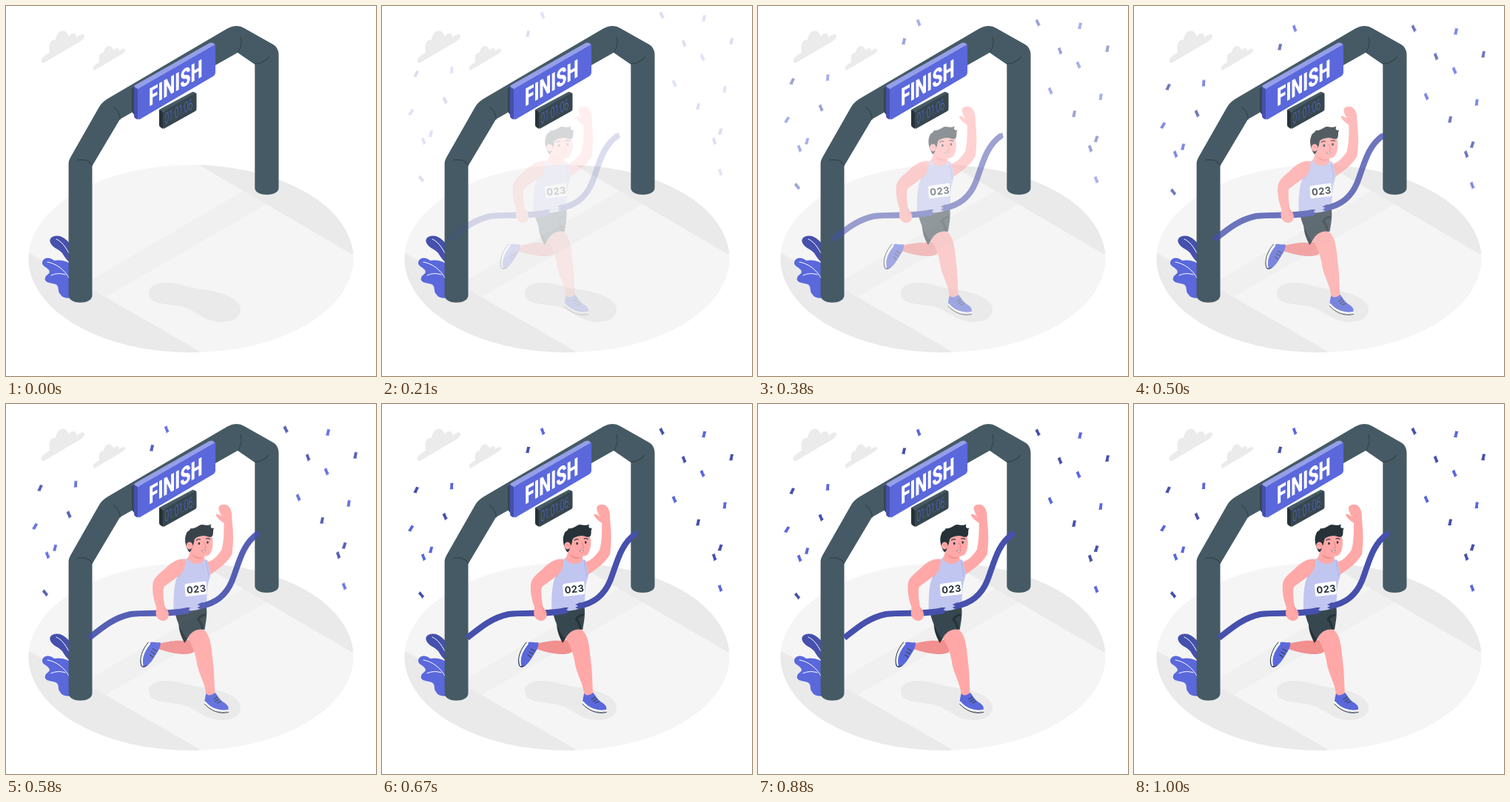
Recreate the animation shown at these times as an HTML page. Size 500 by 500 pixels, loop 1040 ms.

```html
<!DOCTYPE html>
<html lang="en">
<head>
<meta charset="utf-8">
<title>Finish line</title>
<style>
  html, body { margin: 0; width: 100%; height: 100%; overflow: hidden; background: #fff; }
  svg { display: block; width: 100%; height: 100%; }
  .blue { fill: #5a68dc; }
  .navy { fill: #4650ad; }
  .skin { fill: #ffa8a7; }
  .skin2 { fill: #f28f8f; }
  .slate { fill: #455a64; }
  .dark { fill: #37474f; }
  .ink { fill: #263238; }
  .shade { fill: #eaeaea; }
  .line { fill: none; stroke-linecap: round; stroke-linejoin: round; }
  .ribbon { fill: none; stroke: #4650ad; stroke-width: 8; }
</style>
</head>
<body>
<svg viewBox="0 0 500 500">
  <defs>
    <clipPath id="disc"><ellipse cx="250" cy="341.5" rx="219.5" ry="126.8"/></clipPath>
    <path id="cloud" d="M48 76C46 70 54 66 59 63C56 51 62 44 67 46C68 33 80 28 85 41C89 35 96 36 95 43C101 37 107 37 106 42C105 46 97 50 90 54L56 74C52 77 49 78 48 76Z"/>
    <path id="bit" d="M-1-4.4C.6-4.8 1.800-3.800 3.200-4.400C2.400-1.500 1.500 1.400 1.800 3.900C.2 4.600-1.400 3.500-3 4.300C-1.600 1.400-1.600-1.600-1-4.400Z"/>
  </defs>

  <!-- ground -->
  <g clip-path="url(#disc)">
    <rect y="200" width="500" height="280" fill="#f5f5f5"/>
    <path fill="#f0f0f0" d="M105 376L320 250L352 268L135 393Z"/>
    <path class="shade" d="M260 214.5L472 338V200H260Z"/>
    <path class="shade" d="M28 331.8L267 469.8H28Z"/>
  </g>
  <path class="shade" d="M193 389C192 378 205 373 219 374C238 375 247 381 266 383C292 386 318 396 317 411C315 424 302 428 288 427C267 425 258 413 241 407C224 402 195 406 193 389Z"/>

  <!-- sky -->
  <g fill="#ebebeb">
    <use href="#cloud"/>
    <use href="#cloud" transform="translate(82.4 29.5) scale(.741)"/>
  </g>

  <!-- plant -->
  <path class="navy" d="M60 320C57 313 65 309 73 311C81 314 86 320 90 326V348C83 346 80 340 76 334C71 328 63 327 60 320Z"/>
  <path class="blue" d="M49 346C51 339 60 339 65 344C74 342 85 345 92 352V393C84 396 76 395 73 389C69 385 73 379 67 376C60 374 51 374 53 367C55 362 61 362 58 357C56 353 48 352 49 346Z"/>
  <g class="line" stroke="#fff" stroke-width="1">
    <path d="M68 315C75 318 80 325 85 334"/>
    <path d="M56 346C68 348 79 356 86 369M61 364C67 361 74 361 80 363"/>
  </g>

  <!-- arch -->
  <path class="slate" d="M84.600 391V213C84.600 209 86 207 88 203L125 138C128 132 132 128.500 137 125.500L299 30.500C308 26 315 26 322 30L361 52C366 55 368.500 60 368.500 66V246C368.500 258 336.300 258 336.300 246V79L313 63L154 153L116.500 216V391C116.500 404 84.600 404 84.600 391Z"/>
  <g class="line" stroke="#37474f" stroke-width="1.4">
    <path d="M97 208C105 207 113 209 116.500 215"/>
    <path d="M146 137C151 141 154 146 154 153"/>
    <path d="M314 62C318 55 319 49 317 42"/>
    <path d="M337 78C344 78 351 74 355 69"/>
  </g>
  <path class="dark" d="M170 112L174 108V148L170 143Z"/>

  <!-- banner -->
  <path fill="#959fe9" d="M173 110Q173 107 176 106L275 50Q278 49 280 50L283 53L178 113Z"/>
  <path class="navy" d="M173 109L178 112V153.500L175 152Q173 151 173 148Z"/>
  <path class="blue" d="M178 114Q178 112 180 111L280 53.500Q283 52 283 55V90Q283 93 280 95L181 153Q178 154.500 178 151Z"/>
  <text transform="matrix(.68 -.385 0 1 193 136)" font-family="Roboto, sans-serif" font-weight="900" font-size="33.500" fill="#fff">FINISH</text>

  <!-- clock -->
  <path class="slate" d="M207 140L252 116Q254 115.500 257 118L212 143Z"/>
  <path class="ink" d="M207 140L212 142.500V166L209 164Q207 163 207 161Z"/>
  <path class="dark" d="M212 144Q212 142.500 214 141.500L255 118Q257.500 117 257.500 119V139Q257.500 141 256 142L214 165.500Q212 166.500 212 164Z"/>
  <text transform="matrix(.5 -.275 0 1 214.500 159.500)" font-family="Roboto, sans-serif" font-weight="300" font-size="20" fill="#5a68dc">01:01:06</text>

  <g id="confetti" opacity="0"></g>

  <g id="runner" opacity="0">
    <!-- rear leg -->
    <path class="skin2" d="M207 324C220 322 229 319 240 320L252 318C259 322 261 332 255 336C246 340 229 338 208 331Z"/>
    <path class="blue" d="M198 322C202 321 206 323 211 322C212 328 209 332 206 337C201 345 197 353 189 356C184 356 184 350 186 344C188 336 193 330 198 322Z"/>
    <path class="line" stroke="#fff" stroke-width="2.200" d="M196.500 324C190 332 184.500 343 187 353"/>
    <path class="line" stroke="#263238" stroke-width="1" d="M195 322C187 331 182 344 185.500 354C188 356 191 355 193 353"/>
    <path class="line" stroke="#37474f" stroke-width="1.300" d="M201 331L206 334M199 335L204 338M197 339L201 342"/>

    <!-- front leg -->
    <path class="ink" d="M236 297L256 304L244 323C239 314 236 306 236 297Z"/>
    <path class="skin" d="M246 313C252 304 264 302 271 306C280 315 280 331 282 347C284 361 284 377 285 394C282 397 276 396 273 393C272 378 264 367 261 353C259 337 254 325 246 313Z"/>
    <path class="dark" d="M230 279L273 272C275 283 273 293 271 305C262 303 253 306 247 318C238 305 233 292 230 279Z"/>
    <path class="line" stroke="#263238" stroke-width="3" d="M271 285C267 286 264 288 262 291C266 294 267 298 268 303"/>
    <path class="blue" d="M273 391C276 395 281 394 285 390C288 393 290 398 295 402C300 405 304 408 303 413C300 418 292 417 286 414C280 411 274 407 271 403C271 399 272 395 273 391Z"/>
    <path class="line" stroke="#fff" stroke-width="2.200" d="M271.500 403C278 411 290 417 303 414"/>
    <path class="line" stroke="#263238" stroke-width="1" d="M271 405.500C278 413.500 291 420 303 416.500"/>
    <path class="line" stroke="#37474f" stroke-width="1.300" d="M283 399L288 396M285 402L290 399M288 404L293 402"/>

    <!-- raised arm -->
    <path class="skin" d="M273 213C280 214 288 206 294 197C297 186 297 173 297 161C293 158 287 154 286 149C289 148 291 150 294 152C292 147 288 141 291 138C294 135 301 135 304 139C308 144 308 150 308 157C310 173 310 188 308 203C302 214 290 223 278 231Z"/>

    <!-- torso -->
    <path class="skin" d="M251 197L270 201L271 210L277 217L262 226L240 212C246 211 251 208 251 197Z"/>
    <path class="skin2" d="M253 202C257 206 263 208 269 207C265 211 257 210 253 202Z"/>
    <path fill="#c1c6f0" d="M243 210L248 209C252 217 266 219 271 210L275 211C275 219 281 225 278 235C273 248 275 260 273 274C259 281 243 281 229 278C229 262 229 248 233 236C237 228 242 219 243 210Z"/>
    <path class="line" stroke="#a8afe5" stroke-width="1" d="M236 234C239 228 243 220 243 211M276 233C277 225 273 218 273 211"/>

    <!-- ribbon -->
    <path class="ribbon" d="M115 316C134 301 148 289 171 284C194 281 224 285 248 279"/>
    <path class="ribbon" d="M266 273C289 269 301 256 308 239C317 217 321 190 343 175"/>
    <path class="navy" d="M246 275L252 275L249 278L253 280L247 284Z"/>
    <path class="navy" d="M268 268L261 271L265 273L261 275L267 278Z"/>
    <path class="navy" d="M339 174L344 171L346 177L342 181Z"/>

    <!-- bib -->
    <path fill="#fff" d="M246 243L271 239.500Q273 239 273 241L274 255Q274 257 272 257.300L247 260Q245 260 245 258L244 245Q244 243.500 246 243Z"/>
    <text transform="translate(259.800 250) rotate(-6)" y="4.800" text-anchor="middle" font-family="Inter, sans-serif" font-weight="700" font-size="13" letter-spacing=".5" fill="#263238">023</text>

    <!-- lowered arm -->
    <path class="skin" d="M245 210C246 219 242 229 235 233L216 247C214 255 216 264 217 274C222 279 224 284 221 290C218 294 212 294 208 290C204 286 205 281 206 275C202 264 200 254 201 243C202 235 209 230 217 223C226 214 235 208 245 210Z"/>
    <path class="line" stroke="#f28f8f" stroke-width="1" d="M217 274C218 279 218 282 222 283"/>

    <!-- head -->
    <path class="skin" d="M253 184C260 178 272 178 280 176C283 185 283 197 277 204C270 208 258 206 253 198Z"/>
    <path class="ink" d="M250 200C245 193 243 182 246 176C247 171 251 172 252 168C257 169 260 166 264 164C269 161 273 166 280 162.500C278 166 280 169 284 167.500C281 171 284 175 281 179C277 181 274 178 269 178C263 179 258 180 257 184C257 188 255 191 254 194C253 198 252 200 250 200Z"/>
    <ellipse class="skin" cx="250.500" cy="191.500" rx="4.300" ry="5"/>
    <g class="ink">
      <ellipse cx="263.500" cy="188.500" rx="1.300" ry="1.700"/>
      <ellipse cx="275" cy="187" rx="1.300" ry="1.700"/>
    </g>
    <g class="line" stroke="#263238" stroke-width="1.200">
      <path d="M260 184Q262 182 265 183M273 182Q275 181 278 182.500"/>
    </g>
    <path class="line" stroke="#f07f80" stroke-width="1" d="M270 187L273 194L270 194.500M249 190Q251 189 252 192"/>
    <path fill="#fff" stroke="#9b4a4d" stroke-width=".6" d="M266.500 198Q269.500 198.500 272 197Q272 200 270 200Q267.500 200 266.500 198Z"/>
  </g>
</svg>
<script>
  const runner = document.getElementById('runner');
  const confetti = document.getElementById('confetti');

  // x, y, angle, dark or not
  const bits = [
    [217, 37, -32, 0], [197, 62, 2, 1], [46, 116, 14, 1], [94, 111, -8, 0],
    [85, 152, -35, 1], [39, 168, 20, 0], [66, 197, 4, 0], [56, 207, -32, 0],
    [53, 258, -50, 1], [378, 37, -38, 1], [435, 41, 2, 0], [408, 75, -32, 1],
    [433, 94, -35, 0], [472, 72, 0, 1], [395, 129, -35, 0], [463, 137, -4, 0],
    [427, 160, 0, 1], [457, 194, 7, 1], [449, 207, -30, 1], [457, 249, -32, 0]
  ];
  confetti.innerHTML = bits.map(([x, y, a, d]) =>
    `<use href="#bit" class="${d ? 'navy' : 'blue'}" transform="translate(${x} ${y}) rotate(${a})"/>`
  ).join('');

  const LOOP = 1040, FPS = 24, SLIDE = 30;
  const curve = (a, b, s) => 3 * a * s * (1 - s) ** 2 + 3 * b * s * s * (1 - s) + s ** 3;

  // cubic-bezier(.36, -.01, .5, 1.38)
  function ease(x) {
    let lo = 0, hi = 1;
    for (let i = 0; i < 30; i++) {
      const mid = (lo + hi) / 2;
      if (curve(.36, .5, mid) < x) lo = mid; else hi = mid;
    }
    return curve(-.01, 1.38, (lo + hi) / 2);
  }

  function draw(ms) {
    const step = Math.floor((ms + 4) * FPS / 1000);
    const p = step < 3 ? 0 : ease(Math.min(1, (step + .5) / FPS));
    const shift = (p - 1) * SLIDE;
    runner.setAttribute('transform', `translate(${shift} 0)`);
    confetti.setAttribute('transform', `translate(0 ${shift})`);
    for (const g of [runner, confetti]) g.setAttribute('opacity', Math.min(1, p));
  }

  const start = performance.now();
  function tick() {
    draw((performance.now() - start) % LOOP);
    requestAnimationFrame(tick);
  }
  tick();
</script>
</body>
</html>
```
